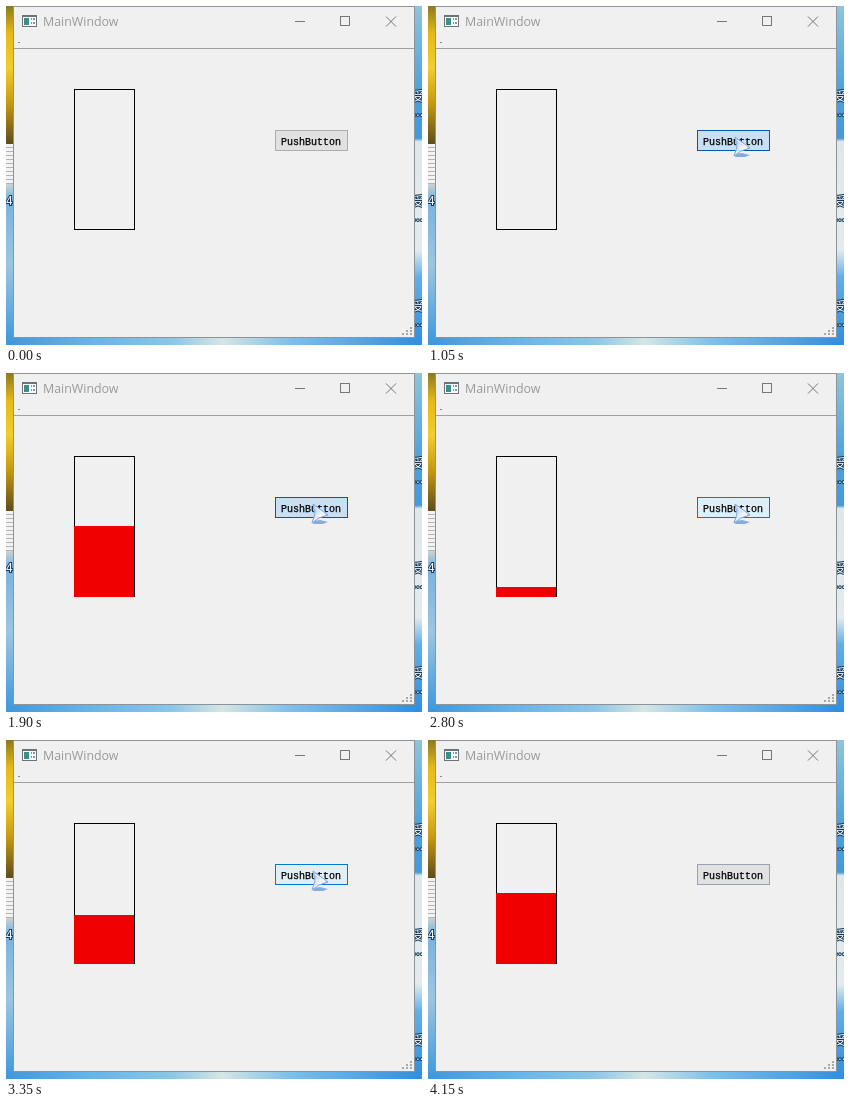
These frames come from a looping animation (416 by 339 pixels, 4.25 s). An HTML page:

```html
<!DOCTYPE html>
<html lang="en">
<head>
<meta charset="utf-8">
<title>MainWindow</title>
<style>
  html, body { margin: 0; width: 100%; height: 100%; overflow: hidden; }
  svg { display: block; width: 416px; height: 339px; }
  .crisp { shape-rendering: crispEdges; }
  .title { font: 12.4px "Open Sans", "Noto Sans", sans-serif; fill: #999; }
  .label { font: 10px "Liberation Mono", "Noto Sans Mono", monospace; fill: #000; stroke: #000; stroke-width: .25px; }
  .desk { font: 12px "Noto Sans CJK SC", "Noto Sans CJK", sans-serif; fill: #fff; stroke: #123a5c; stroke-width: 2px; paint-order: stroke; }
</style>
</head>
<body>
<svg viewBox="0 0 416 339">
  <defs>
    <linearGradient id="flower" x2="0" y2="1">
      <stop offset="0" stop-color="#8b7a1e"/>
      <stop offset=".2" stop-color="#e6b917"/>
      <stop offset=".45" stop-color="#f2cd2c"/>
      <stop offset=".7" stop-color="#c79a12"/>
      <stop offset="1" stop-color="#5d4d1c"/>
    </linearGradient>
    <linearGradient id="left" x2="0" y2="1">
      <stop offset="0" stop-color="#c9d3d2"/>
      <stop offset=".1" stop-color="#79b2de"/>
      <stop offset=".5" stop-color="#9cc6e0"/>
      <stop offset="1" stop-color="#3d97dc"/>
    </linearGradient>
    <linearGradient id="right" x2="0" y2="1">
      <stop offset="0" stop-color="#8fc4dc"/>
      <stop offset=".25" stop-color="#4aa3e0"/>
      <stop offset=".39" stop-color="#3f9ae0"/>
      <stop offset=".4" stop-color="#dfe7ea"/>
      <stop offset=".72" stop-color="#e3ebee"/>
      <stop offset=".8" stop-color="#5fb0ea"/>
      <stop offset="1" stop-color="#2f8ee0"/>
    </linearGradient>
    <linearGradient id="floor">
      <stop offset="0" stop-color="#3f97dc"/>
      <stop offset=".18" stop-color="#62b2e8"/>
      <stop offset=".4" stop-color="#8cc6e8"/>
      <stop offset=".52" stop-color="#d5e6e4"/>
      <stop offset=".68" stop-color="#7fc0ea"/>
      <stop offset="1" stop-color="#2f8ee0"/>
    </linearGradient>
    <linearGradient id="glass" x2="1" y2="1">
      <stop offset="0" stop-color="#a9c9f4"/>
      <stop offset=".55" stop-color="#eef6ff"/>
      <stop offset="1" stop-color="#8fb6ec"/>
    </linearGradient>
    <pattern id="lines" width="8" height="4" patternUnits="userSpaceOnUse">
      <path fill="#f3f3f3" d="M0 0h8v4H0z"/><path fill="#b5b5b5" d="M0 1h8v1H0z"/>
    </pattern>
  </defs>

  <!-- desktop -->
  <g class="crisp">
    <path fill="url(#floor)" d="M0 331h416v8H0z"/>
    <path fill="url(#flower)" d="M0 0h8v138H0z"/>
    <path fill="url(#lines)" d="M0 138h8v40H0z"/>
    <path fill="url(#left)" d="M0 178h8v161H0z"/>
    <path fill="url(#right)" d="M408 0h8v339h-8z"/>
  </g>
  <text class="desk" x="0" y="199">4</text>
  <g id="icons"></g>

  <!-- window -->
  <g class="crisp">
    <path fill="#8d9499" d="M7 0h402v332H7z"/>
    <path fill="#f0f0f0" d="M8 1h400v330H8z"/>
    <path fill="#a0a0a0" d="M8 42h400v1H8z"/>
    <path fill="#888" d="M12 36h2v1h-2z"/>
    <path fill="#6d7478" d="M16 9h15v12H16z"/>
    <path fill="#fafafa" d="M17 11h13v9H17z"/>
    <path fill="#3b8f88" d="M18 12h5v7h-5z"/>
    <path fill="#8b9498" d="M25 12h1v2h-1zM27 12h2v2h-2zM25 16h1v2h-1zM27 16h2v2h-2z"/>
    <path fill="#777" d="M289 15h10v1h-10z"/>
    <path fill="none" stroke="#777" d="M334.5 10.5h9v9h-9z"/>
    <path id="grip" fill="#a8a8a8"/>
  </g>
  <path stroke="#777" d="M380 10.5l10 10M390 10.5l-10 10"/>
  <text class="title" x="37" y="20">MainWindow</text>

  <g class="crisp">
    <path fill="none" stroke="#000" d="M68.5 83.5h60v140h-60z"/>
    <rect id="fill" x="68" width="60" fill="#f00000"/>
    <rect id="button" x="269.5" y="124.5" width="72" height="20"/>
  </g>
  <text class="label" x="275" y="139">PushButton</text>

  <g id="cursor">
    <path fill="#4f86d0" opacity=".65" d="M1 17L7 16L15 18L10 20L0 20z"/>
    <path fill="url(#glass)" fill-opacity=".9" stroke="#78a6e4" stroke-linejoin="round" d="M0 0L15 11L6 14L-1 19L2 10z"/>
    <path fill="none" stroke="#fff" stroke-width=".8" d="M2 3L12 10.5L5.500 12.500"/>
  </g>
</svg>
<script>
const LOOP = 4250, STEP = 50;
const BOTTOM = 224, FULL = 153;
const REST = { x: 386, y: 200 }, TARGET = { x: 307, y: 131 }, AWAY = { x: 424, y: 190 };
const RUNS = [
  { from: 1100, to: 1900, top: 207 },
  { from: 2800, to: 3650, top: 214 }
];
const LOOK = {
  normal: ['#e1e1e1', '#adadad'],
  hover: ['#e0eff5', '#0078d7'],
  pressed: ['#c9dff4', '#005aa6'],
  fading: ['#e1e1e1', '#97a3b8']
};

const $ = id => document.getElementById(id);
const clamp = v => Math.max(0, Math.min(1, v));
const mix = (a, b, p) => a + (b - a) * p;
const smooth = p => p * p * (3 - 2 * p);
const between = (t, a, b) => t >= a && t < b;

$('icons').innerHTML = [95, 200, 305].map(y =>
  `<text class="desk" x="406" y="${y}">受</text><text class="desk" x="407" y="${y + 15}">...</text>`).join('');

let dots = '';
for (let row = 0; row < 3; row++)
  for (let col = 0; col <= row; col++)
    dots += `M${404 - col * 4} ${321 + row * 3}h2v2h-2z`;
$('grip').setAttribute('d', dots);

function levelTop(t) {
  const run = RUNS.filter(r => t >= r.from).pop();
  if (!run) return BOTTOM;
  return Math.round(mix(run.top, FULL, clamp((t - run.from) / (run.to - run.from))));
}

function pointer(t) {
  const leaving = t >= 3950;
  const [a, b] = leaving ? [TARGET, AWAY] : [REST, TARGET];
  const p = leaving ? clamp((t - 3900) / 250) : smooth(clamp((t - 500) / 350));
  return { x: mix(a.x, b.x, p), y: mix(a.y, b.y, p), shown: between(t, 50, 4150) };
}

function buttonLook(t, { x, y }) {
  if (between(t, 1050, 1100) || between(t, 1900, 2800)) return LOOK.pressed;
  if (x >= 269 && x < 342 && y >= 124 && y < 145) return LOOK.hover;
  return t > 3950 ? LOOK.fading : LOOK.normal;
}

function draw(now) {
  const t = Math.floor((now % LOOP) / STEP) * STEP;
  const top = levelTop(t), pos = pointer(t);
  const [fill, stroke] = buttonLook(t, pos);
  $('fill').setAttribute('y', top);
  $('fill').setAttribute('height', BOTTOM - top);
  $('button').setAttribute('fill', fill);
  $('button').setAttribute('stroke', stroke);
  $('cursor').setAttribute('transform', `translate(${Math.round(pos.x)} ${Math.round(pos.y)})`);
  $('cursor').setAttribute('visibility', pos.shown ? 'visible' : 'hidden');
}

const start = performance.now();
function tick() {
  draw(performance.now() - start);
  requestAnimationFrame(tick);
}
tick();
</script>
</body>
</html>
```
